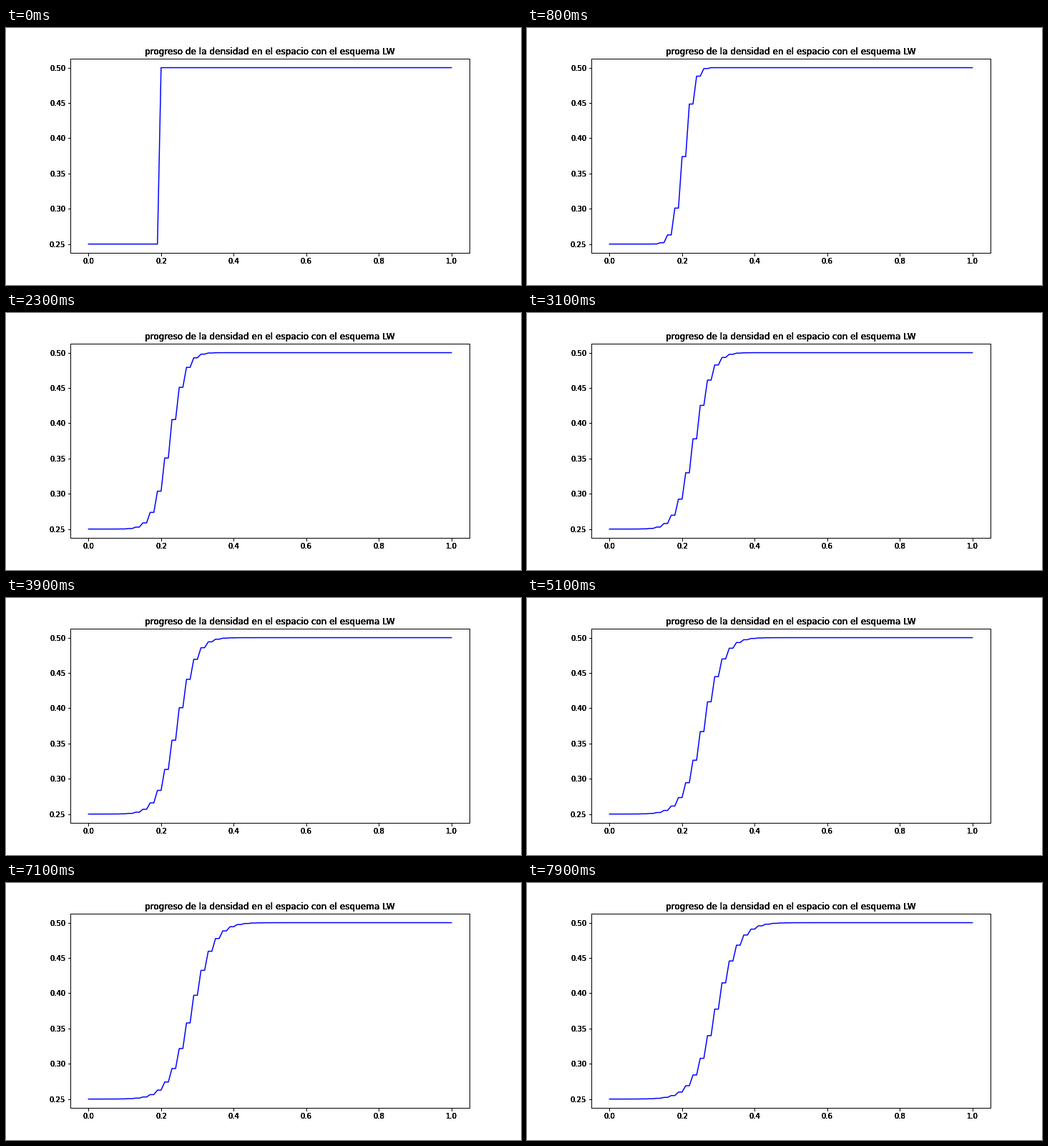
Recreate the animation shown at these times as a matplotlib script. Size 720x360 px, loop 8000 ms.

```python
import numpy as np
import matplotlib.pyplot as plt
from matplotlib.animation import FuncAnimation

FRAMES, INTERVAL = 80, 100
DX, DT = 0.01, 0.005
LAYERS = 5  # stacked copies give the dark, hard-edged lettering

plt.rcParams.update({"font.family": "DejaVu Sans", "font.size": 10})


def flux(rho):
    return rho * (1 - rho)


def step(rho):
    """One Lax-Friedrichs step of the traffic equation, fixed ends."""
    new = rho.copy()
    f = flux(rho)
    new[1:-1] = (rho[:-2] + rho[2:]) / 2 - DT / (2 * DX) * (f[2:] - f[:-2])
    return new


def solve(rho, count):
    states = [rho]
    while len(states) < count:
        states.append(step(states[-1]))
    return states


x = np.linspace(0, 1, 101)
states = solve(np.where(np.arange(x.size) < 20, 0.25, 0.5), FRAMES)

fig = plt.figure(figsize=(10, 5), dpi=72, facecolor="white")


def add_layer():
    ax = fig.add_axes([0.125, 0.125, 0.775, 0.755], facecolor="none")
    ax.set_xlim(-0.05, 1.05)
    ax.set_ylim(0.2375, 0.5125)
    ax.set_xticks(np.arange(0, 1.1, 0.2))
    ax.set_yticks(np.arange(0.25, 0.51, 0.05))
    ax.set_title("progreso de la densidad en el espacio con el esquema LW",
                 fontsize=12)
    return ax


layers = [add_layer() for _ in range(LAYERS)]
line, = layers[0].plot(x, states[0], color="blue", lw=1.5)


def update(i):
    line.set_ydata(states[i])
    return line,


anim = FuncAnimation(fig, update, frames=FRAMES, interval=INTERVAL,
                     repeat=True, repeat_delay=0)
plt.show()
```
